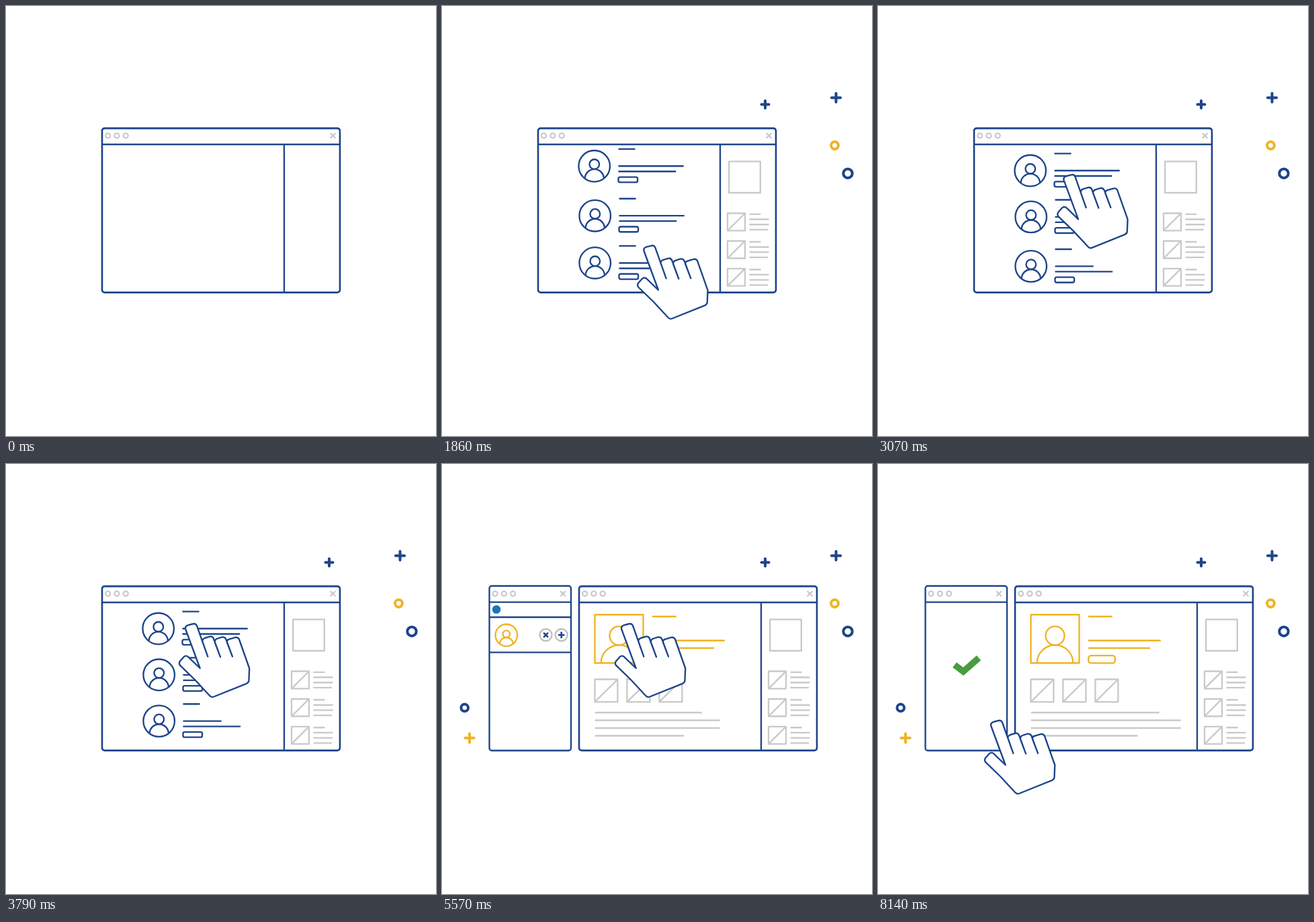
An HTML page for the animation above (9.07 s loop, 640 px wide and 640 px high).

```html
<!DOCTYPE html>
<html lang="en">
<head>
<meta charset="utf-8">
<title>Profile import</title>
<style>
  html, body { margin: 0; width: 100%; height: 100%; overflow: hidden; background: #fff; }
  svg { display: block; width: 100vw; height: 100vh; }
</style>
</head>
<body>
<svg id="stage" viewBox="0 0 640 640" fill="none" stroke-width="2.35" stroke-linejoin="round">
  <defs><clipPath id="view"><rect x="143" y="206" width="354" height="220.5"/></clipPath></defs>
</svg>
<script>
const LOOP = 9070;
const NAVY = '#1e448a', GOLD = '#f0b323', GRAY = '#c9c9cb', WHITE = '#fff';
const stage = document.getElementById('stage');

// drawing helpers
function add(parent, tag, attrs) {
  const el = document.createElementNS('http://www.w3.org/2000/svg', tag);
  for (const k in attrs) el.setAttribute(k, attrs[k]);
  return parent.appendChild(el);
}
const group = (p, attrs) => add(p, 'g', attrs);
const path = (p, d, attrs) => add(p, 'path', { d, ...attrs });
const ring = (p, cx, cy, r, attrs) => add(p, 'circle', { cx, cy, r, ...attrs });
const rect = (p, x, y, width, height, rx = 0, attrs) => add(p, 'rect', { x, y, width, height, rx, ...attrs });
const hline = (p, x1, x2, y) => path(p, `M${x1} ${y}H${x2}`);
const plus = (p, h, attrs) => path(p, `M${-h} 0H${h}M0 ${-h}V${h}`, attrs);
const cross = (p, x, y, h, attrs) =>
  path(p, `M${x - h} ${y - h}l${2 * h} ${2 * h}m0 ${-2 * h}l${-2 * h} ${2 * h}`, attrs);

function thumb(p, x, y, w, h) {
  rect(p, x, y, w, h);
  path(p, `M${x} ${y + h}l${w} ${-h}`);
}
function bust(p, x, headY, headR, baseY, r) {
  ring(p, x, headY, headR);
  path(p, `M${x - r} ${baseY}a${r} ${r} 0 0 1 ${2 * r} 0`);
}
function titleBar(p, x, closeX) {
  const g = group(p, { stroke: GRAY });
  for (let i = 0; i < 3; i++) ring(g, x + 13.3 * i, 193, 3.6, { 'stroke-width': 2.2 });
  cross(g, closeX, 193, 3.3, { 'stroke-width': 2.2, 'stroke-linecap': 'round' });
}

// timing helpers
const clamp = v => Math.max(0, Math.min(1, v));
const span = (t, a, b) => clamp((t - a) / (b - a));
const cubic = p => p < .5 ? 4 * p ** 3 : 1 - 4 * (1 - p) ** 3;
const smooth = p => p * p * (3 - 2 * p);
const ease = (t, a, b) => cubic(span(t, a, b));
const move = (el, x, y, more = '') => el.setAttribute('transform', `translate(${x} ${y}) ${more}`);
const fade = (el, v) => el.setAttribute('opacity', v);
function track(keys, t) {
  let [, x, y] = keys[0];
  for (let i = 1; i < keys.length; i++) {
    const k = ease(t, keys[i - 1][0], keys[i][0]);
    x += (keys[i][1] - keys[i - 1][1]) * k;
    y += (keys[i][2] - keys[i - 1][2]) * k;
  }
  return [x, y];
}

// sparks: end point, distance left at `mark`, start, mark, end
const sparks = [
  { x: 481, y: 146.5, dx: 3, dy: -4.5, from: 300, mark: 1000, end: 1430, h: 5.5, color: NAVY },
  { x: 586.5, y: 136.5, dx: 25, dy: -20.5, from: 560, mark: 1000, end: 1430, h: 6.6, color: NAVY },
  { x: 584.5, y: 207.5, dx: 10, dy: -6.5, from: 400, mark: 1000, end: 1430, r: 5.4, color: GOLD },
  { x: 604, y: 249.2, dx: 13.5, dy: -7, from: 400, mark: 1000, end: 1430, r: 6.7, color: NAVY },
  { x: 33.7, y: 362.8, dx: -20, dy: 4, from: 4100, mark: 4450, end: 4790, r: 5.3, color: NAVY },
  { x: 41, y: 407.8, dx: -19, dy: 10, from: 4100, mark: 4450, end: 4790, h: 6.6, color: GOLD }
];
for (const s of sparks) {
  s.el = group(stage, { stroke: s.color, 'stroke-width': 4, 'stroke-linecap': 'round' });
  if (s.r) ring(s.el, 0, 0, s.r); else plus(s.el, s.h);
}

// small panel
const panel = group(stage, { stroke: NAVY });
rect(panel, 70.5, 181.5, 121.5, 245, 3.5, { fill: WHITE });
const row = group(panel);
hline(row, 70.5, 192, 228);
hline(row, 70.5, 192, 280.4);
ring(row, 81, 216.5, 6.3, { fill: '#1b75b8', stroke: 'none' });
const face = group(row, { stroke: GOLD });
ring(face, 95.8, 254.8, 16.3);
bust(face, 95.8, 253, 5.2, 268, 9.9);
for (const x of [154.5, 177.7]) ring(row, x, 254.5, 9, { stroke: '#c0c0c2' });
const dial = ring(row, 177.7, 254.5, 9, {
  stroke: '#29a3e0', pathLength: 1, transform: 'rotate(-90 177.7 254.5)'
});
cross(row, 154.5, 254.5, 3.4, { 'stroke-width': 2.6 });
plus(row, 4.8, { transform: 'translate(177.7 254.5)', 'stroke-width': 2.6 });
hline(panel, 70.5, 192, 205.6);
titleBar(panel, 79, 180);
const tick = path(panel, 'M114 299L127 308.8L150 288.6', {
  stroke: '#489d40', 'stroke-width': 9.6, 'stroke-linejoin': 'miter', pathLength: 1
});

// browser window
const win = group(stage, { stroke: NAVY });
rect(win, 143, 182, 354, 244.2, 3.5, { fill: WHITE });
const view = group(win, { 'clip-path': 'url(#view)' });
const list = group(view);
const starts = [1640, 1723, 1806, 1864, 2016, 2168];
const items = starts.map((start, i) => {
  const n = i % 3, x = n ? 1 : 0, g = group(list);
  ring(g, 226.7 + x, 245, 23.3);
  bust(g, 226.8 + x, 242.3, 7.3, 263.8, 14.2);
  hline(g, 262.5 + x, 287.6 + x, 219.6);
  hline(g, 262.5 + x, n === 2 ? 320.7 : 359.7 + x, 245);
  hline(g, 262.5 + x, 348.2 + x, 253);
  rect(g, 262.5 + x, 261.3, 28.6, 7.8, 2.5);
  return { el: g, n, start, fresh: i > 2 };
});
const side = [group(view, { stroke: GRAY })];
rect(side[0], 427.2, 231.4, 46.6, 46.6);
for (let i = 0; i < 3; i++) {
  const g = group(view, { stroke: GRAY }), y = 308.5 + 41.2 * i;
  thumb(g, 425, y, 26, 25.8);
  [474.5, 486.5, 486.5, 485].forEach((end, j) => hline(g, 457.5, end, y + 1.3 + 7.7 * j));
  side.push(g);
}
rect(win, 143, 182, 354, 244.2, 3.5);
path(win, 'M143 206H497M414 206V426');
titleBar(win, 151.6, 486.5);

// profile page
const avatar = group(stage, { stroke: GOLD });
rect(avatar, 227.5, 224.2, 72, 72);
bust(avatar, 263.5, 255.6, 14, 296.2, 26.8);
const facts = [[348.7, 227], [420.7, 262.8], [405, 274]].map(([end, y], i) => {
  const el = group(stage, { stroke: GOLD });
  hline(el, 0, end - 313, 0);
  return { el, y, start: 4800 + 110 * i };
});
const badge = group(stage, { stroke: GOLD });
rect(badge, 313.2, 285.1, 39.8, 11.2, 4);
const tiles = [0, 1, 2].map(i => {
  const el = group(stage, { stroke: GRAY });
  thumb(el, -17, -16.8, 34, 33.6);
  return { el, x: 244.4 + 48 * i, start: 4860 + 120 * i };
});
const texts = [191, 223, 223, 159].map((width, i) => {
  const el = path(stage, '', { stroke: GRAY });
  return { el, width, y: 370 + 11.5 * i };
});

// hand
const hand = group(stage, { stroke: NAVY });
path(hand, 'M288.7 304L267.3 246Q266 242 270 240.2L278 238Q282 236.8 284 240.5L300.3 286.7' +
  'L292.3 264Q292 260.5 296 259L303.5 256.8Q307.5 256 309 260L319 287.2' +
  'L310.7 265Q310.5 261.5 314 260L321.5 257.7Q325.8 257 327.5 261L337 286.6' +
  'L329 265.5Q328.3 262 332 260.8L341 258.2Q345.2 257.2 347 261L362.2 304' +
  'L361.5 322Q361.3 325.3 358 326.8L309 346.5Q306 347.7 303.5 345.2L281.5 321.5L259.5 300.2' +
  'Q256.5 297 259 293.5L264.5 287.2Q268 284 271.5 287.3Z', { fill: WHITE });
const route = [
  [222, 390, 206], [1430, 33.3, 47.5], [1570, 33.3, 47.5], [1980, 33.3, 126.5],
  [2460, 33.3, 47.5], [2560, 33.3, 47.5], [3430, 0, 0], [5720, 0, 0],
  [6360, -96, 24.7], [6640, -96, 24.7], [7210, -99, 144]
];

function draw(t) {
  for (const s of sparks) {
    const k = clamp((s.end - t) / (s.end - s.mark) * 1e-9 + (t < s.end ? 1 : 0))
      * ((s.end - Math.min(t, s.end)) / (s.end - s.mark)) ** 3;
    fade(s.el, t < s.from ? 0 : 1);
    move(s.el, s.x - s.dx * k, s.y - s.dy * k, `rotate(${45 * k})`);
  }

  fade(panel, t < 3930 ? 0 : 1);
  move(panel, 72 * (1 - ease(t, 3930, 4700)), 0);
  fade(row, span(t, 4300, 4700) * (1 - span(t, 7290, 7570)));
  const turn = ease(t, 6500, 7200);
  dial.setAttribute('stroke-dasharray', `${turn} 2`);
  fade(dial, turn > 0 ? 1 : 0);
  const drawn = smooth(span(t, 7720, 8140));
  tick.setAttribute('stroke-dasharray', `${drawn} 2`);
  fade(tick, drawn > 0 ? 1 : 0);

  move(win, 61 * ease(t, 3930, 4700), 0);
  for (const { el, n, start, fresh } of items) {
    const scroll = ease(t, start, start + 1100);
    const wait = fresh ? 1 - scroll : 1 - ease(t, 140 + 60 * n, 970 + 60 * n) - scroll;
    move(el, 0, 68.8 * n + 207 * wait);
  }
  fade(list, 1 - span(t, 3860, 4220));
  side.forEach((el, i) => move(el, 0, 200 * (1 - ease(t, 140 + 40 * i, 860 + 40 * i))));

  fade(avatar, span(t, 4480, 4790));
  for (const { el, y, start } of facts) {
    const k = ease(t, start, start + 500);
    fade(el, k > 0 ? 1 : 0);
    move(el, 313, y, `scale(${k} 1)`);
  }
  fade(badge, span(t, 5150, 5450));
  for (const { el, x, start } of tiles) {
    const k = ease(t, start, start + 420);
    fade(el, k > 0 ? 1 : 0);
    move(el, x, 337.3, `scale(${k})`);
  }
  const grown = smooth(span(t, 4565, 5923));
  for (const { el, width, y } of texts) {
    fade(el, t > 4800 ? 1 : 0);
    el.setAttribute('d', `M227.7 ${y}h${width * grown}`);
  }

  // the tap shrinks the hand towards its fingertip
  const press = 1 - .07 * Math.sin(Math.PI * span(t, 3440, 3790));
  const [x, y] = track(route, t);
  move(hand, x, y, `translate(275 240) scale(${press}) translate(-275 -240)`);
}

const began = performance.now();
function loop() {
  draw((performance.now() - began) % LOOP);
  requestAnimationFrame(loop);
}
loop();
</script>
</body>
</html>
```
